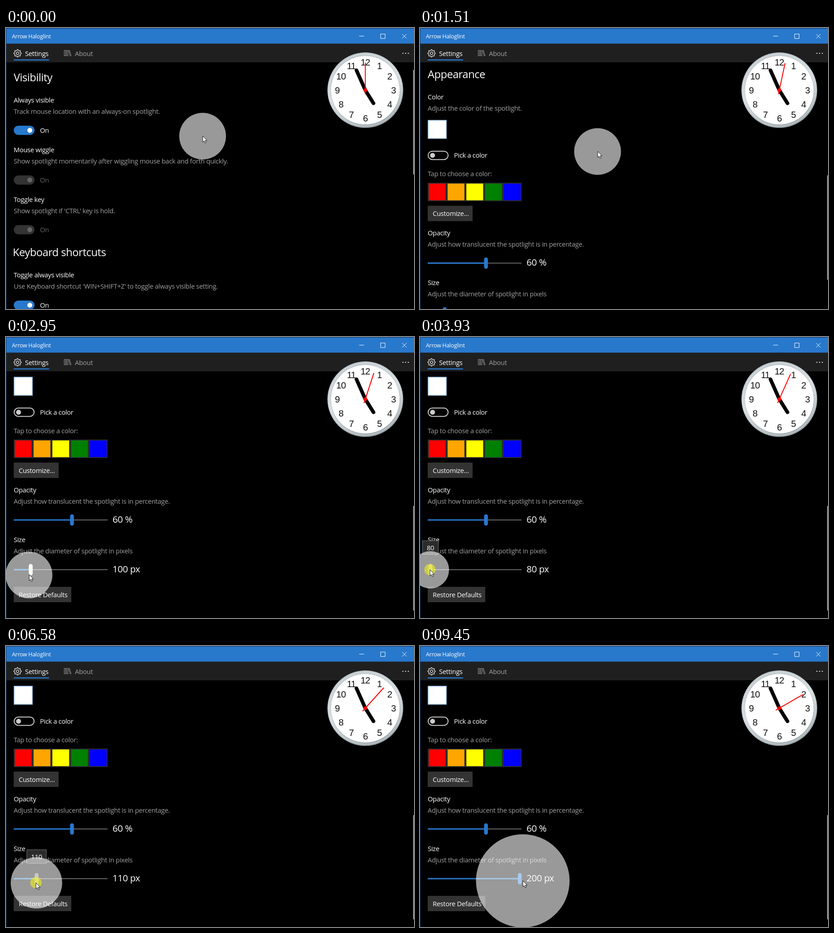
An HTML page for the animation above (9.96 s loop, 900x622 px).

```html
<!DOCTYPE html>
<html lang="en">
<head>
<meta charset="utf-8">
<title>Arrow Haloglint</title>
<style>
  html, body { margin: 0; width: 100%; height: 100%; overflow: hidden; background: #000; }
  svg { display: block; width: 900px; height: 622px; }
  text { font-family: "Open Sans", "Noto Sans", sans-serif; font-size: 14.6px; letter-spacing: -.02em; fill: #fff; }
  .head { font-size: 23.6px; }
  .note { fill: #a0a0a0; }
  .dim { fill: #666; }
  .value { font-size: 20.4px; }
  .title { font-size: 12.4px; }
  .hour { font: 20px "Liberation Sans", Arial, sans-serif; letter-spacing: -.04em; fill: #111; text-anchor: middle; }
  .line { fill: none; stroke: #fff; }
</style>
</head>
<body>
<svg viewBox="0 0 900 622">
  <defs>
    <clipPath id="view"><rect y="76" width="900" height="546"/></clipPath>
    <linearGradient id="rim" x1=".2" y1="0" x2=".6" y2="1">
      <stop offset="0" stop-color="#b9c2c6"/>
      <stop offset=".5" stop-color="#d3dadd"/>
      <stop offset="1" stop-color="#98a2a6"/>
    </linearGradient>
  </defs>
  <rect width="900" height="622"/>
  <g clip-path="url(#view)"><g id="page"></g></g>
  <rect id="bar" x="898" width="2" height="231" fill="#999"/>

  <rect y="34" width="900" height="42" fill="#1f1f1f"/>
  <rect width="900" height="34.6" fill="#2878cc"/>
  <path d="M0 622V0H900V1.200H1V622z" fill="#16406e"/>
  <text class="title" x="13" y="23">Arrow Haloglint</text>
  <path class="line" d="M779 18h11M826.300 13.300h10v10h-10zM873.700 13.300l10 10m0-10l-10 10"/>
  <g id="gear" class="line" transform="translate(25.5 56)" stroke-width="1.2"><circle r="2.9"/></g>
  <text x="42" y="62">Settings</text>
  <rect x="17" y="69.400" width="78" height="2.500" fill="#2878cc"/>
  <path class="line" style="stroke:#9a9a9a" d="M128.500 49.500h3v12h-3zM133.500 49.500h3v12h-3zM138 50l2-.7 3.500 12-2 .7z"/>
  <text class="note" x="152" y="62">About</text>
  <path fill="#fff" d="M874.500 55h2v2h-2zm6 0h2v2h-2zm6 0h2v2h-2z"/>

  <g id="clock" transform="translate(792.6 137.600)">
    <circle r="83.500" fill="url(#rim)"/>
    <circle r="79.500" fill="none" stroke="#e6ebed" stroke-width="2.500" opacity=".4"/>
    <circle r="76" fill="#fff" stroke="#c6cdd0"/>
    <g id="hours"></g>
    <path d="M-19.500 -44L0 0L18 29" fill="none" stroke="#000" stroke-width="8" stroke-linecap="round" stroke-linejoin="round"/>
    <g id="second"><path d="M0 9V-61" stroke="#f00" stroke-width="2"/><circle r="4" fill="#f00"/></g>
  </g>

  <g id="tip">
    <rect id="tipBox" y="451" height="30" fill="#2b2b2b" stroke="#767676"/>
    <text id="tipText" y="471.500" text-anchor="middle"></text>
  </g>
  <circle id="spot" fill="#fff" fill-opacity=".6"/>
  <circle id="click" r="12.500" fill="#ff0" fill-opacity=".5"/>
  <path id="cursor" d="M0 0V13.500l3-2.800 2.100 5 2.200-1-2.100-4.700H9.400z" fill="#fff" stroke="#000" stroke-width=".9"/>
</svg>
<script>
const LOOP = 9960, START = 320, STEP = 109.9;
const PRESS = 28, RELEASE = 80;
const BLUE = '#2878cc';
const $ = id => document.getElementById(id);

function add(parent, tag, attrs, content = '') {
  const el = document.createElementNS('http://www.w3.org/2000/svg', tag);
  set(el, attrs);
  el.textContent = content;
  return parent.appendChild(el);
}
function set(el, attrs) {
  for (const key in attrs) el.setAttribute(key, attrs[key]);
}

const page = $('page');
const label = (x, y, text, cls = '') => add(page, 'text', { x, y, class: cls }, text);
const box = (x, y, width, height, fill, more = {}) =>
  add(page, 'rect', { x, y, width, height, fill, ...more });

function toggle(y, state, text) {
  const on = state === 'on', off = state === 'off';
  if (off) box(18, y - 9.3, 44, 18.6, 'none', { rx: 9.3, stroke: '#ccc', 'stroke-width': 2 });
  else box(17, y - 10.3, 46, 20.6, on ? BLUE : '#333', { rx: 10.3 });
  add(page, 'circle', { cx: off ? 27.7 : 52.5, cy: y, r: 5.4, fill: on ? '#fff' : off ? '#ccc' : '#666' });
  label(75, y + 5.5, text, on || off ? '' : 'dim');
}
function setting(y, name, note) {
  label(17, y, name);
  label(17, y + 25, note, 'note');
}
function button(y, width, text) {
  box(17, y, width, 34, '#333');
  label(28, y + 23, text);
}
function slider(y, text) {
  box(17, y - 1, 207, 2, '#666');
  const fill = box(17, y - 1.5, 0, 3, BLUE);
  const thumb = box(0, y - 12.5, 8.5, 25, BLUE, { rx: 4.2 });
  const value = label(235, y + 6, text, 'value');
  return {
    value,
    update(x, color) {
      set(fill, { width: x - 17 });
      set(thumb, { x: x - 4.2, fill: color });
    }
  };
}

label(17, 118, 'Visibility', 'head');
setting(165, 'Always visible', 'Track mouse location with an always-on spotlight.');
toggle(226.500, 'on', 'On');
setting(275, 'Mouse wiggle', 'Show spotlight momentarily after wiggling mouse back and forth quickly.');
toggle(336.500, 'disabled', 'On');
setting(385, 'Toggle key', "Show spotlight if 'CTRL' key is hold.");
toggle(446.500, 'disabled', 'On');
label(15, 505, 'Keyboard shortcuts', 'head');
setting(552, 'Toggle always visible', "Use Keyboard shortcut 'WIN+SHIFT+Z' to toggle always visible setting.");
toggle(613.500, 'on', 'On');
label(17, 672, 'Appearance', 'head');
setting(719, 'Color', 'Adjust the color of the spotlight.');
box(18.2, 765.2, 39.6, 39.6, '#fff', { stroke: '#b3d6f8', 'stroke-width': 2 });
toggle(842.500, 'off', 'Pick a color');
label(17, 888.500, 'Tap to choose a color:', 'note');
box(17, 903, 207, 41, '#2b2b2b');
['red', 'orange', 'yellow', 'green', 'blue'].forEach((c, k) => box(19.5 + k * 41.4, 905, 37, 37, c));
button(954, 99, 'Customize...');
setting(1020, 'Opacity', 'Adjust how translucent the spotlight is in percentage.');
const opacity = slider(1081, '60 %');
setting(1130, 'Size', 'Adjust the diameter of spotlight in pixels');
const size = slider(1191, '100 px');
button(1229, 127, 'Restore Defaults');

for (let h = 1; h <= 12; h++) {
  const a = h * Math.PI / 6;
  add($('hours'), 'text', { class: 'hour', x: 62 * Math.sin(a), y: 7.3 - 62 * Math.cos(a) }, h);
}
let cog = '';
for (let k = 0; k < 32; k++) {
  const a = (k - .5) * Math.PI / 16, r = k % 4 < 2 ? 8.2 : 6.3;
  cog += `${k ? 'L' : 'M'}${r * Math.cos(a)} ${r * Math.sin(a)}`;
}
add($('gear'), 'path', { d: cog + 'z' });

// Keys: [step, value, ...]
const scrollKeys = [[1, 0], [6, 272], [13, 676]];
const pathKeys = [
  [-1, 434, 239], [4, 392, 273], [12, 392, 273], [16, 168, 407], [19, 50, 525], [21, 47, 539],
  [26, 54, 517], [29, 54, 515], [33, 22, 515], [36, 21, 515], [40, 92, 516], [44, 188, 517],
  [45, 214, 517], [46, 222, 518], [48, 222, 518], [55, 88, 522], [57, 66, 524], [58, 66, 524],
  [68, 220, 521], [70, 227, 522], [78, 227, 522], [81, 227, 519.5]
];
function sample(keys, i) {
  if (i <= keys[0][0]) return keys[0].slice(1);
  const n = keys.findIndex(k => k[0] > i);
  if (n < 0) return keys[keys.length - 1].slice(1);
  const a = keys[n - 1], b = keys[n], p = (i - a[0]) / (b[0] - a[0]);
  return a.slice(1).map((v, k) => v + (b[k + 1] - v) * p);
}
const clamp = (v, lo, hi) => Math.min(hi, Math.max(lo, v));

function draw(t) {
  // The screen was refreshed in coarse steps.
  const i = t < START ? -1 : Math.floor((t - START) / STEP + .3);
  const [scroll] = sample(scrollKeys, i);
  const [x, y] = sample(pathKeys, i);
  const [spotX, spotY] = sample(pathKeys, i - .13);
  const pressed = i >= PRESS && i < RELEASE;
  const thumb = i < PRESS ? 54.5 : clamp(spotX, 21.5, 220);
  const px = Math.round((80 + (thumb - 21.5) / 1.654) / 10) * 10;
  const over = mid => x > 17 && x < 224 && Math.abs(y + scroll - mid) < 20;

  set(page, { transform: `translate(0 ${-scroll})` });
  set($('bar'), { y: 93 + scroll * .416 });
  opacity.update(145.5, over(1081) ? '#fff' : BLUE);
  size.update(thumb, pressed ? '#767676' : over(1191) ? '#fff' : BLUE);
  size.value.textContent = px + ' px';

  const tipWidth = px < 100 ? 35 : 43;
  set($('tip'), { visibility: pressed ? 'visible' : 'hidden' });
  set($('tipBox'), { x: thumb - tipWidth / 2, width: tipWidth });
  set($('tipText'), { x: thumb });
  $('tipText').textContent = px;

  set($('spot'), { cx: spotX - .3, cy: spotY + .4, r: px * .516 });
  set($('click'), { cx: x, cy: y, visibility: pressed ? 'visible' : 'hidden' });
  set($('cursor'), { transform: `translate(${x} ${y})` });
  set($('second'), { transform: `rotate(${6 * Math.floor((START + i * STEP + 565) / 1000)})` });
}

const begin = performance.now();
function tick() {
  draw((performance.now() - begin) % LOOP);
  requestAnimationFrame(tick);
}
tick();
</script>
</body>
</html>
```
